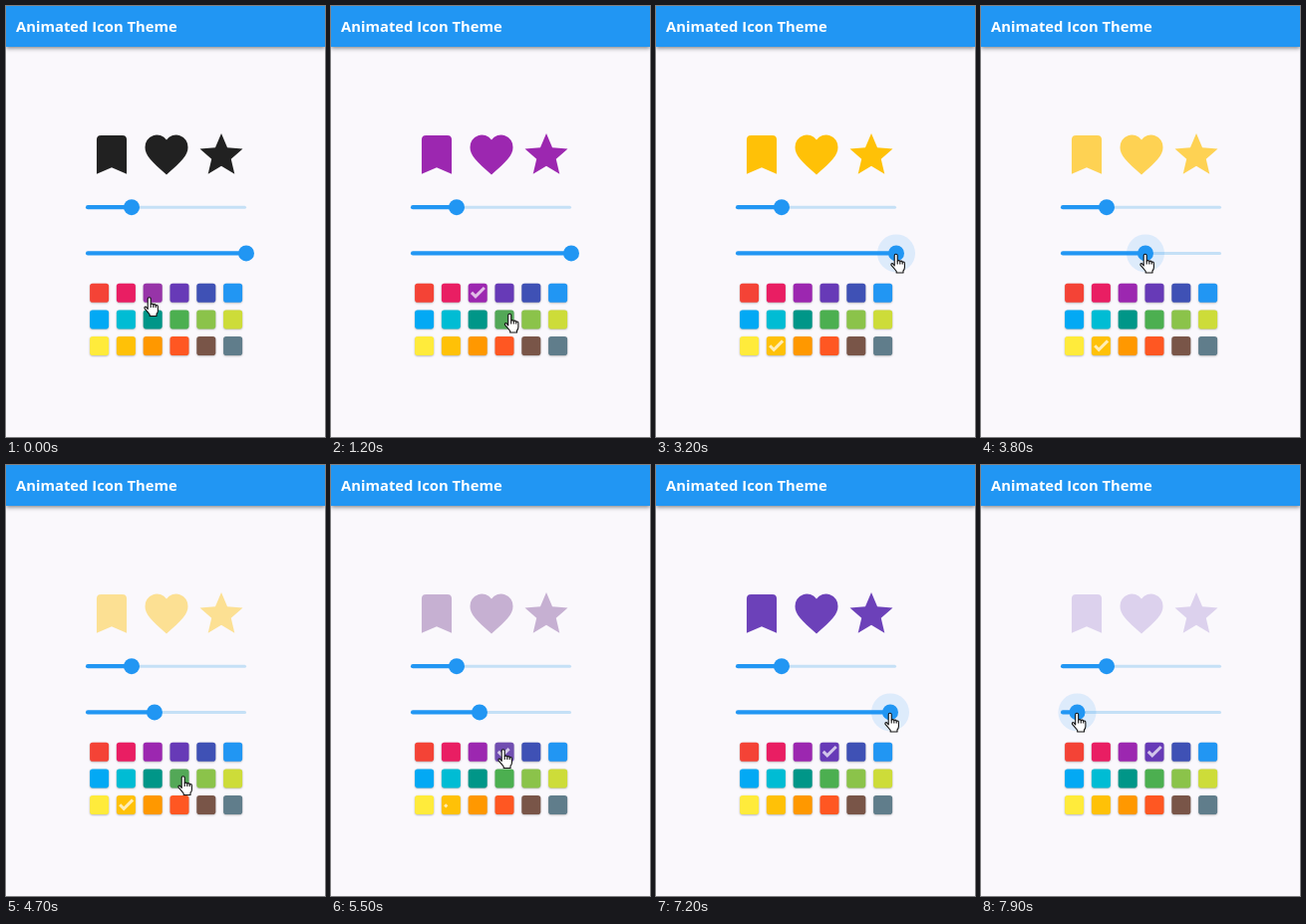
These frames come from a looping animation (320x433 px, 8000 ms). An HTML page with a canvas:

```html
<!DOCTYPE html>
<html lang="en">
<head>
<meta charset="utf-8">
<title>Animated Icon Theme</title>
<style>
  html, body { margin: 0; width: 100%; height: 100%; overflow: hidden; background: #faf8fc; }
  canvas { position: absolute; left: 0; top: 0; width: 320px; height: 433px; }
  header {
    position: absolute; left: 0; top: 0; width: 310px; height: 41px; padding-left: 10px;
    background: #2196f3; box-shadow: 0 1px 4px rgba(0, 0, 0, .4), 0 2px 5px rgba(0, 0, 0, .15);
    color: #fff; font: 700 14.8px/41px "Open Sans", "Noto Sans", sans-serif;
  }
</style>
</head>
<body>
<canvas></canvas>
<header>Animated Icon Theme</header>
<script>
const LOOP = 8000, FADE = 300;
const BLUE = '#2196f3', DARK = '#212121';
const LEFT = 80, RIGHT = 241, SLIDER_Y = 248.4;
const COLORS = `
  #f44336 #e91e63 #9c27b0 #673ab7 #3f51b5 #2196f3
  #03a9f4 #00bcd4 #009688 #4caf50 #8bc34a #cddc39
  #ffeb3b #ffc107 #ff9800 #ff5722 #795548 #607d8b`.trim().split(/\s+/);

const DRAGS = [
  { from: 3250, to: 4000, x: 149 },
  { from: 6300, to: 7000, x: 235 },
  { from: 7200, to: 7900, x: 96.5 }
];

// Places where the hand rests. Without a spot it rides the lower slider;
// with a pick it clicks that swatch halfway through its stay.
const VISITS = [
  { from: 0, to: 700, spot: [138, 292], pick: 2 },
  { from: 1100, to: 1700, spot: [173.5, 308.5], pick: 9 },
  { from: 2080, to: 2600, spot: [115, 339], pick: 13 },
  { from: 3100, to: 4150 },
  { from: 4500, to: 4700, spot: [172, 312] },
  { from: 5000, to: 5500, spot: [167, 285], pick: 3 },
  { from: 6100, to: LOOP }
];
const PICKS = VISITS.filter(v => 'pick' in v)
  .map(v => ({ time: (v.from + v.to) / 2, index: v.pick }));

const BOOKMARK = new Path2D('M17 3H7q-2 0-2 2v16l7-3 7 3V5q0-2-2-2z');
const HEART = new Path2D('M12 21.3C5 15 2 12.3 2 8.5a5.5 5.5 0 0 1 10-3.4 5.5 5.5 0 0 1 10 3.4C22 12.3 19 15 12 21.3z');
const STAR = new Path2D();
for (let i = 0; i < 10; i++) {
  const r = i % 2 ? 4.78 : 10.51, a = i * Math.PI / 5;
  STAR.lineTo(12 + r * Math.sin(a), 12.51 - r * Math.cos(a));
}
STAR.closePath();
const CHECK = new Path2D('M-6.2-.3l4 4 8.9-8.9');
const CHECK_LENGTH = 12.9 * Math.SQRT2;
const PALM = new Path2D('M4.2 12.5V2.2a1.5 1.5 0 0 1 3 0V7.5q1.4-1 2.6.4 1.6-.8 2.4.7 2.2-.5 2.2 1.6V14q0 2-1.4 3.5v2H6.2V18Q4 15 1 11.8 .6 9.8 2.4 10.2z');
const FINGERS = new Path2D('M7.2 7.5V11M9.8 8v3M12.2 8.6V11');

const canvas = document.querySelector('canvas');
const ctx = canvas.getContext('2d');
const dpr = window.devicePixelRatio || 1;
canvas.width = 320 * dpr;
canvas.height = 433 * dpr;

const clamp = v => Math.max(0, Math.min(1, v));
const lerp = (a, b, p) => a + (b - a) * p;
const progress = (t, from, to) => {
  const p = clamp((t - from) / (to - from));
  return p * p * (3 - 2 * p);
};

const thumbAt = t => DRAGS.reduce((x, d) => lerp(x, d.x, progress(t, d.from, d.to)), RIGHT);

function handAt(t) {
  const spot = v => v.spot || [thumbAt(t) - 6, 248.5];
  const i = VISITS.findLastIndex(v => v.from <= t);
  const here = VISITS[i], next = VISITS[i + 1] || here;
  const p = t > here.to ? progress(t, here.to, next.from) : 0;
  return spot(here).map((v, k) => lerp(v, spot(next)[k], p));
}

function mix(from, to, p) {
  const part = (hex, i) => parseInt(hex.slice(1 + 2 * i, 3 + 2 * i), 16);
  return `rgb(${[0, 1, 2].map(i => Math.round(lerp(part(from, i), part(to, i), p)))})`;
}

// Runs a drawing with its own origin and scale.
function at(x, y, scale, draw) {
  ctx.save();
  ctx.translate(x, y);
  ctx.scale(scale, scale);
  draw();
  ctx.restore();
}

function box(x, y, w, h, r, color) {
  ctx.fillStyle = color;
  ctx.beginPath();
  ctx.roundRect(x, y, w, h, r);
  ctx.fill();
}

function disc(x, y, r, color) {
  ctx.fillStyle = color;
  ctx.beginPath();
  ctx.arc(x, y, r, 0, 7);
  ctx.fill();
}

function drawSlider(x, y, halo) {
  box(LEFT, y - 1.5, RIGHT - LEFT, 3, 1.5, '#c5e0f6');
  box(LEFT, y - 2.1, x - LEFT, 4.2, 2.1, BLUE);
  if (halo) disc(x, y, 19 * halo, 'rgba(33,150,243,.13)');
  disc(x, y, 8, BLUE);
}

function drawCheck(reveal) {
  if (!reveal) return;
  ctx.strokeStyle = 'rgba(255,255,255,.7)';
  ctx.lineWidth = 3;
  ctx.setLineDash([CHECK_LENGTH * reveal, CHECK_LENGTH]);
  ctx.stroke(CHECK);
}

// Every swatch is drawn around its own centre.
function drawSwatch(i, tip, pick, last, p) {
  const x = 93.6 + 26.8 * (i % 6), y = 288.2 + 26.7 * Math.floor(i / 6);
  const cover = color => box(-9.5, -9.5, 19, 19, 2.8, color);
  at(x, y, 1, () => {
    ctx.shadowColor = 'rgba(0,0,0,.3)';
    ctx.shadowBlur = 2 * dpr;
    ctx.shadowOffsetY = .7 * dpr;
    cover(COLORS[i]);
    ctx.shadowColor = 'transparent';
    const hover = Math.max(Math.abs(tip[0] - x), Math.abs(tip[1] - y)) < 9.5;
    if (hover) cover('rgba(128,128,128,.15)');
    if (i === pick) {
      cover(`rgba(225,225,225,${.4 * (1 - p)})`);
      drawCheck(p);
    } else if (i === last) {
      drawCheck(1 - p);
    }
  });
}

function drawHand(x, y) {
  at(x, y, 1, () => {
    ctx.fillStyle = '#fff';
    ctx.strokeStyle = '#111';
    ctx.lineJoin = 'round';
    ctx.lineWidth = 1.1;
    ctx.fill(PALM);
    ctx.stroke(PALM);
    ctx.stroke(FINGERS);
  });
}

function render(t) {
  ctx.setTransform(dpr, 0, 0, dpr, 0, 0);
  ctx.clearRect(0, 0, 320, 433);

  const done = PICKS.filter(k => k.time <= t);
  const { time = 0, index: pick } = done.at(-1) || {};
  const { index: last } = done.at(-2) || {};
  const p = clamp((t - time) / FADE);

  // Icon opacity trails the slider slightly.
  ctx.globalAlpha = (thumbAt(t - 150) - LEFT) / (RIGHT - LEFT);
  const color = mix(COLORS[last] || DARK, COLORS[pick] || DARK, p);
  [BOOKMARK, HEART, STAR].forEach((icon, i) => at(80.2 + 55 * i, 123.6, 2.15, () => {
    ctx.fillStyle = color;
    ctx.fill(icon);
  }));
  ctx.globalAlpha = 1;

  const thumb = thumbAt(t);
  const [x, y] = handAt(t);
  const tip = [x + 5.5, y + 1];
  const distance = Math.hypot(tip[0] - thumb, tip[1] - SLIDER_Y);
  drawSlider(126, 202.2, 0);
  drawSlider(thumb, SLIDER_Y, clamp((20 - distance) / 8));
  COLORS.forEach((_, i) => drawSwatch(i, tip, pick, last, p));
  drawHand(x, y);
}

const begin = performance.now();
function tick() {
  render((performance.now() - begin) % LOOP);
  requestAnimationFrame(tick);
}
tick();
</script>
</body>
</html>
```
